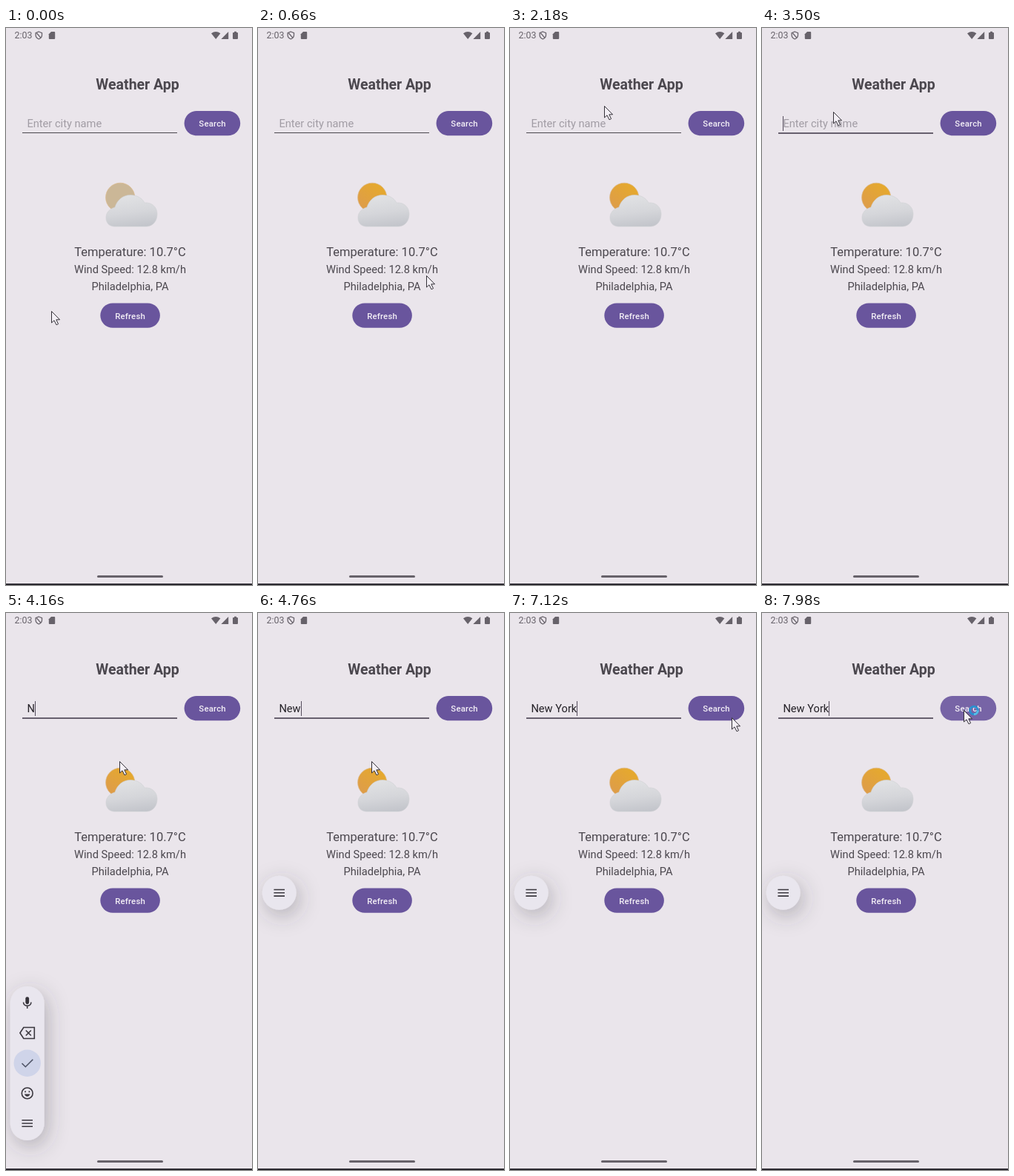
An HTML page for the animation above (8000 ms loop, 332 px wide and 752 px high).

```html
<!DOCTYPE html>
<html lang="en">
<head>
<meta charset="utf-8">
<title>Weather App</title>
<style>
  html, body { margin: 0; width: 100%; height: 100%; overflow: hidden; background: #eae5eb; }
  svg { display: block; font-family: Roboto, sans-serif; font-size: 14.65px; fill: #4b474e; }
  .mid { text-anchor: middle; }
  .button rect { fill: #69559d; }
  .button text { fill: #f3eff6; font-size: 11.4px; font-weight: 500; letter-spacing: .2px; }
  .status { fill: #67626a; }
  .line { fill: none; stroke: #3a373e; stroke-width: 1.6; }
  .panel { fill: #e9e6ee; filter: url(#shadow); }
</style>
</head>
<body>
<svg width="332" height="752" viewBox="0 0 332 752">
  <defs>
    <linearGradient id="cloud" x1=".4" y1="0" x2=".6" y2="1">
      <stop offset="0" stop-color="#e1e2e4"/>
      <stop offset=".55" stop-color="#d5d6da"/>
      <stop offset="1" stop-color="#c3c5cb"/>
    </linearGradient>
    <linearGradient id="glow" x1="0" y1="1" x2=".8" y2="0">
      <stop offset="0" stop-color="#dc9a50"/>
      <stop offset="1" stop-color="#e6aa2a"/>
    </linearGradient>
    <filter id="shadow" x="-200%" y="-200%" width="500%" height="500%">
      <feDropShadow dx="4" dy="8" stdDeviation="14" flood-color="#403a48" flood-opacity=".32"/>
    </filter>
    <path id="menu" class="line" d="M-7.3-4.3H7.3M-7.3 0H7.3M-7.3 4.3H7.3"/>
  </defs>
  <rect width="332" height="752" fill="#eae5eb"/>

  <g class="status">
    <text x="11.6" y="14.3" font-size="12.4">2:03</text>
    <path d="M44.3 5L48.5 6.6V9.8Q48.3 13.5 44.3 15Q40.3 13.5 40.1 9.8V6.6ZM41.5 7L47 13.4" fill="none" stroke="#67626a" stroke-width="1.3"/>
    <path d="M61 5H65.2Q66.2 5 66.2 6V14Q66.2 15 65.2 15H58.8Q57.8 15 57.8 14V8.2Z"/>
    <path d="M283.2 15L277 7.3Q283.2 2.7 289.4 7.3ZM290.4 15L300.2 5V15ZM306 7Q306 6 307 6H308V4.8H311V6H312Q313 6 313 7V14Q313 15 312 15H307Q306 15 306 14Z"/>
  </g>

  <text class="mid" x="177.5" y="83.4" font-size="19.5" font-weight="700">Weather App</text>
  <text id="hint" x="28.4" y="134.3" fill="#a19ca4">Enter city name</text>
  <text id="typed" x="28.4" y="134.3" fill="#242127"></text>
  <rect id="underline" x="22" y="141" width="209"/>
  <rect id="caret" y="119" width="1" height="20" fill="#544c5c"/>
  <g class="button mid">
    <rect x="240.6" y="112" width="75.6" height="33.3" rx="16.6"/>
    <rect id="ripple" x="240.6" y="112" width="75.6" height="33.3" rx="16.6" style="fill:#fff"/>
    <text x="278.6" y="133">Search</text>
    <rect x="127.3" y="371.4" width="80.6" height="33.4" rx="16.7"/>
    <text x="167.6" y="392.6">Refresh</text>
  </g>

  <circle id="sun" cx="154.2" cy="228.8" r="19.6" stroke="#dcb98c" stroke-width=".7"/>
  <path d="M147 268C139 268 135 263 135 256C135 249 140 244 147 242C150 232 158 225.5 168 225.5C177 225.5 184 230 187 236C197 235 204 242 204 251C204 261 198 268 189 268Z" fill="url(#cloud)" stroke="#cfd0d4" stroke-width=".6"/>

  <g class="mid">
    <text x="167.5" y="307.6" font-size="16.5">Temperature: 10.7°C</text>
    <text x="167.5" y="331">Wind Speed: 12.8 km/h</text>
    <text x="167.5" y="354">Philadelphia, PA</text>
  </g>

  <g id="tools">
    <rect class="panel" x="5.7" y="504" width="46" height="208" rx="23"/>
    <g transform="translate(28.7 526)" class="line">
      <rect x="-2.4" y="-7.8" width="4.8" height="10" rx="2.4" fill="#353239" stroke="none"/>
      <path d="M-5.2-.5C-5.2 6 5.2 6 5.2-.5M0 4.4V8"/>
    </g>
    <path class="line" d="M18.9 567L23.8 559.5H38.3V574.5H23.8ZM26.8 563.5L33.8 570.5M33.8 563.5L26.8 570.5"/>
    <circle cx="28.7" cy="607.7" r="18.2" fill="#cfd4e9"/>
    <path class="line" d="M21.5 608L26.3 612.7L36.3 602.7" style="stroke:#4e5365"/>
    <g transform="translate(28.7 648.4)">
      <circle class="line" r="7.4"/>
      <path d="M-3.8 1.2H3.8Q2.8 4.3 0 4.3T-3.8 1.2Z" fill="#3a373e"/>
      <path d="M-2.7-3.2V-1.2M2.7-3.2V-1.2" class="line"/>
    </g>
    <use href="#menu" x="28.7" y="689"/>
  </g>
  <g id="bubble">
    <circle class="panel" cx="28.7" cy="377.8" r="23"/>
    <use href="#menu" x="28.7" y="377.8"/>
  </g>

  <rect x="123" y="739" width="89" height="3" rx="1.5" fill="#67626a"/>
  <rect y="750" width="332" height="2" fill="#2d2a31"/>

  <g id="pointer">
    <path d="M.5.5V16L4 12.8L7 18.8L9.6 17.6L6.8 11.8H11.6Z" fill="#f4f0f6" stroke="#343138" stroke-linejoin="round"/>
    <g id="busy" transform="translate(14 .5)" fill="none" stroke-width="3">
      <circle r="5.3" stroke="#2b8fd0"/>
      <path id="arc" d="M0-5.3A5.3 5.3 0 0 1 5.3 0" stroke="#55bce6"/>
    </g>
  </g>
</svg>
<script>
const LOOP = 8000, TICK = 130;
const FOCUS = 3170, TYPE = 4160, KEY_GAP = 264, CLICK = 7650, BLINK = 550;
const CITY = "New York";
const $ = id => document.getElementById(id);

// Pointer strokes: start ms, duration ms (0 jumps), end point.
const strokes = [
  [70, 590, 227, 334], [790, 140, 284, 330], [930, 330, 129, 385],
  [1460, 0, 249, 359], [1720, 0, 306, 450], [1980, 0, 294, 288],
  [2180, 0, 127, 105], [2580, 260, 98, 135], [3500, 0, 96, 113],
  [3700, 260, 153, 200], [6860, 0, 306, 143], [7120, 660, 272, 131]
];

const clamp = v => Math.min(1, Math.max(0, v));
const set = (id, attrs) => {
  for (const name in attrs) $(id).setAttribute(name, attrs[name]);
};
const show = (id, opacity) => set(id, { opacity: Number(opacity) });

// Fraction done, advancing one screen refresh at a time.
function progress(t, start, duration) {
  if (t < start) return 0;
  const ticks = Math.floor((t - start) / TICK) + 1;
  return duration ? clamp(ticks * TICK / duration) : 1;
}

function pointerAt(t) {
  return strokes.reduce(([x, y], [start, duration, endX, endY]) => {
    const p = progress(t, start, duration);
    return [x + (endX - x) * p, y + (endY - y) * p];
  }, [61, 382]);
}

// The caret restarts its blink on focus, on every key and after the click.
function caretOn(t, typed) {
  const lastKey = typed ? TYPE + (typed - 1) * KEY_GAP : FOCUS;
  const since = t - (t >= CLICK + 330 ? CLICK + 330 : lastKey);
  return since >= 0 && Math.floor(since / BLINK) % 2 === 0;
}

function draw(now) {
  const t = now % LOOP;
  const focused = t >= FOCUS;
  const typed = t < TYPE ? 0 : Math.min(CITY.length, 1 + Math.floor((t - TYPE) / KEY_GAP));
  const collapsed = t >= TYPE + 200;

  set("pointer", { transform: `translate(${pointerAt(t).map(Math.round)})` });
  show("busy", t >= CLICK + TICK);
  set("arc", { transform: `rotate(${90 * Math.floor((t - CLICK) / 330)})` });

  $("typed").textContent = CITY.slice(0, typed);
  show("hint", !typed);
  set("caret", { x: Math.round(28.4 + (typed && $("typed").getComputedTextLength())) });
  show("caret", caretOn(t, typed));
  set("underline", { height: focused ? 2 : 1, fill: focused ? "#67606e" : "#4b474e" });

  show("tools", collapsed ? 0 : progress(t, 3700, 390));
  show("bubble", collapsed);
  show("ripple", .09 * progress(t, CLICK, 390));
  set("sun", { fill: t < 70 ? "#cbb797" : "url(#glow)" });
  requestAnimationFrame(() => draw(performance.now()));
}
draw(0);
</script>
</body>
</html>
```
